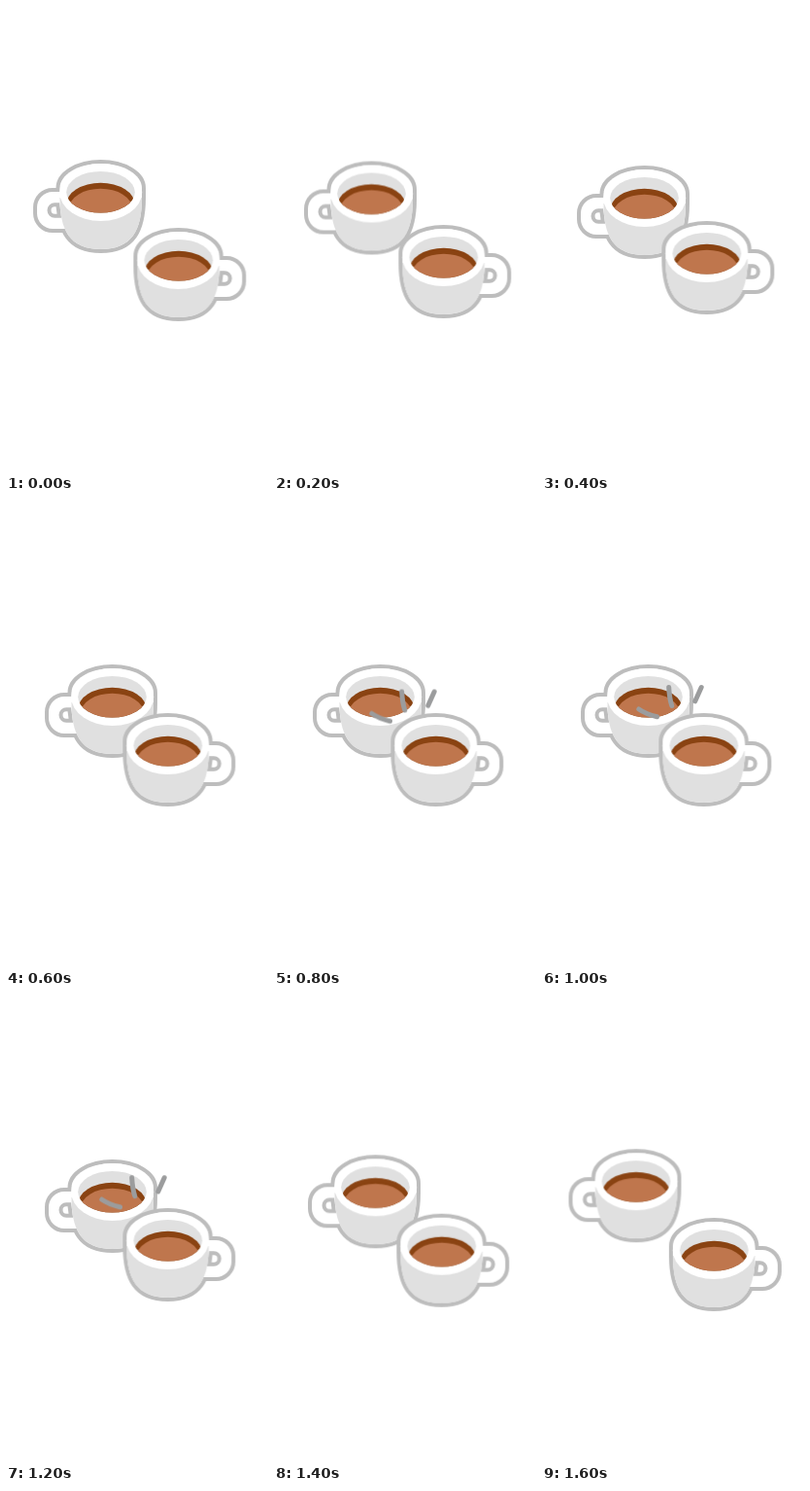
Write an HTML page that moves like this. It is 270 px wide and 480 px high and loops after 1800 ms.

```html
<!DOCTYPE html>
<html lang="en">
<head>
<meta charset="utf-8">
<title>Coffee cups</title>
<style>
  html, body { margin: 0; width: 100%; height: 100%; overflow: hidden; background: #fff; }
  svg { display: block; width: 100vw; height: 100vh; }
  .left, .right, .clink { animation: 1800ms step-end infinite; }
  .left { animation-name: left; }
  .right { animation-name: right; }
  .clink { animation-name: clink; fill: none; stroke: #9b9c9d; stroke-width: 5; stroke-linecap: round; }

  /* nine held poses of 200 ms */
  @keyframes left {
    0% { transform: translate(0, 0); }
    11.1111% { transform: translate(3px, 1.5px); }
    22.2222% { transform: translate(8px, 6px); }
    33.3333% { transform: translate(12px, 10px); }
    77.7778% { transform: translate(7px, 5.3px); }
    88.8889%, 100% { transform: translate(-.5px, -.8px); }
  }
  @keyframes right {
    0% { transform: translate(0, 0); }
    11.1111% { transform: translate(-3px, -3px); }
    22.2222% { transform: translate(-8px, -7px); }
    33.3333% { transform: translate(-11px, -10px); }
    77.7778% { transform: translate(-5px, -4.3px); }
    88.8889%, 100% { transform: translate(-.5px, 0); }
  }
  @keyframes clink {
    0% { transform: translate(1px, 4.5px); visibility: hidden; }
    44.4444% { transform: translate(1px, 4.5px); visibility: visible; }
    55.5556% { transform: translate(0, 0); visibility: visible; }
    66.6667% { transform: translate(-1px, -4.8px); visibility: visible; }
    77.7778%, 100% { transform: translate(0, 0); visibility: hidden; }
  }
</style>
</head>
<body>
<svg viewBox="0 0 270 480">
  <defs>
    <clipPath id="mouth"><ellipse cx="97.5" cy="191.3" rx="35.3" ry="21.3"/></clipPath>
    <g id="shape">
      <path d="M66 191H48A16 16 0 0 0 32 207V213A16 16 0 0 0 48 229H66Z"/>
      <path d="M55.5 187C55.5 173.5 74 162 97.7 162S140 173.5 140 187V197C140 230 130 250 97.7 250S55.5 230 55.5 197Z"/>
    </g>
    <g id="cup">
      <use href="#shape" fill="#bdbdbd" stroke="#bdbdbd" stroke-width="8"/>
      <use href="#shape" fill="#fff"/>
      <path fill="#fff" stroke="#bdbdbd" stroke-width="4" d="M53.3 204.3H50.2A5.7 5.7 0 0 0 50.2 215.7H54.8Z"/>
      <path fill="#e0e0e0" d="M55.5 197C55.5 230 65.4 250 97.7 250S140 230 140 197Z"/>
      <ellipse cx="97.7" cy="191.5" rx="42.5" ry="29.5" fill="#fff"/>
      <g clip-path="url(#mouth)">
        <path fill="#e0e0e0" d="M60 165h76v55h-76z"/>
        <ellipse cx="97.5" cy="203.8" rx="35.3" ry="22" fill="#8a4312"/>
        <ellipse cx="97.5" cy="207.8" rx="32.3" ry="20" fill="#bf764d"/>
      </g>
    </g>
  </defs>
  <g class="left"><use href="#cup"/></g>
  <g class="right"><use href="#cup" transform="translate(275.4 70) scale(-1 1)"/></g>
  <g class="clink">
    <path d="M130.7 191.5Q131.3 203 133.8 210.5"/>
    <path d="M164.2 191.5L157.8 205.8"/>
    <path d="M99.8 214Q107 219 118.5 221.8"/>
  </g>
</svg>
</body>
</html>
```
